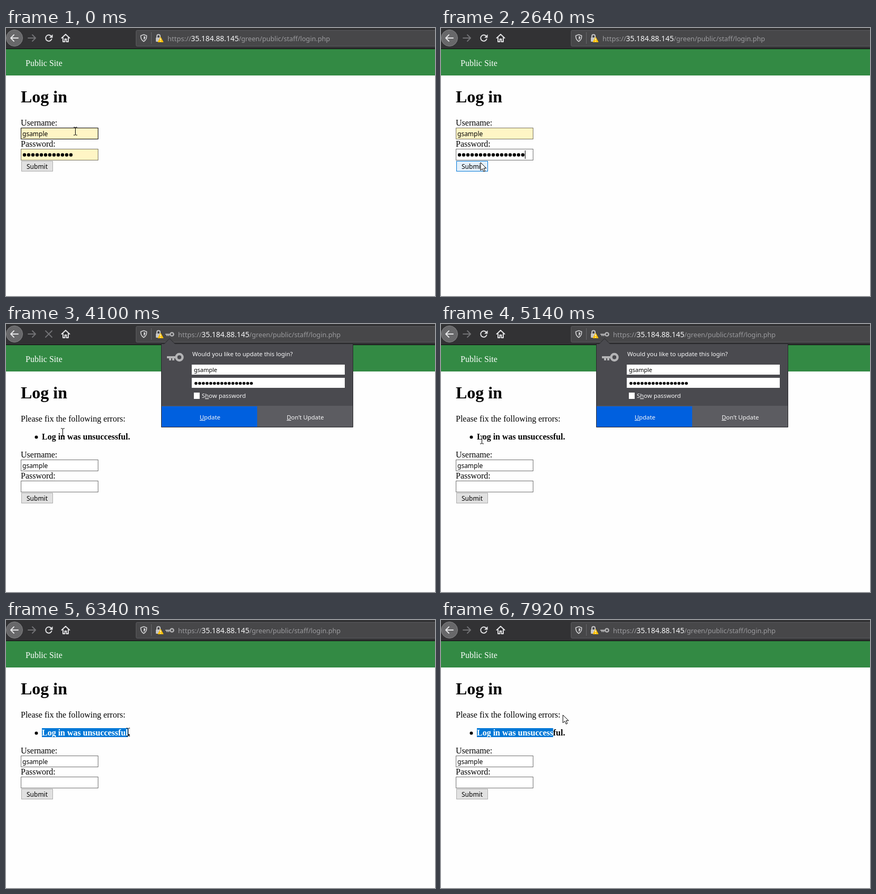
These frames come from a looping animation (813x508 px, 8000 ms). An HTML page:

```html
<!DOCTYPE html>
<html lang="en">
<head>
<meta charset="utf-8">
<title>Log in</title>
<style>
  html, body { margin: 0; width: 100%; height: 100%; overflow: hidden; background: #fefefe; }
  svg { display: block; width: 813px; height: 508px; }
  text { white-space: pre; }
  .serif { font: 16px "Liberation Serif", serif; }
  .bold { font-weight: bold; }
  .title { font-size: 32px; }
  .sans { font: 12px "Noto Sans", "Open Sans", sans-serif; }
  .small { font-size: 11.4px; fill: #f9f9fa; }
  .line { fill: none; stroke: #e4e4e6; stroke-width: 1.9; stroke-linecap: round; stroke-linejoin: round; }
  .dim { stroke: #727275; }
  .under { text-decoration: underline; }
</style>
</head>
<body>
<svg viewBox="0 0 813 508">
  <defs>
    <clipPath id="selClip"><rect id="selClipBox" x="68" y="200" height="26"/></clipPath>
    <g id="keyShape">
      <path d="M0 -2H17V2H14V6H10V2H8V6H4V2H0Z"/>
      <circle cx="23.500" cy="0" r="6" fill="none" stroke="#b4b4b6" stroke-width="4.500"/>
    </g>
  </defs>

  <rect width="813" height="508" fill="#fefefe"/>
  <rect y="39" width="813" height="51" fill="#338a44"/>
  <text class="serif" x="37" y="72" fill="#fff">Public Site</text>
  <text class="serif bold title" x="28" y="141">Log in</text>

  <g id="errors">
    <text class="serif" x="28" y="185">Please fix the following errors:</text>
    <circle cx="57.5" cy="214.5" r="3"/>
    <text class="serif bold" id="message" x="68" y="219">Log in was unsuccessful.</text>
    <rect id="selection" x="68" y="205" height="17" fill="#0078d7"/>
    <text class="serif bold" x="68" y="219" fill="#fff" clip-path="url(#selClip)">Log in was unsuccessful.</text>
  </g>

  <g id="form">
    <text class="serif" x="28" y="185">Username:</text>
    <rect id="userBox" x="28.5" y="189.5" width="146" height="21"/>
    <text class="sans" x="31" y="205">gsample</text>
    <text class="serif" x="28" y="225">Password:</text>
    <rect id="passBox" x="28.5" y="229.5" width="146" height="21"/>
    <g id="passDots"></g>
    <rect id="button" x="29.5" y="252.5" width="59" height="19"/>
    <text class="sans" x="39" y="267">Submit</text>
  </g>
  <rect id="caret" width="1" height="16"/>

  <rect width="813" height="39" fill="#323234"/>
  <rect y="39" width="813" height="1" fill="#0c0c0d"/>
  <circle cx="16" cy="19" r="15.5" fill="#68686a" stroke="#828284"/>
  <path class="line" d="M23 19H9.500M15 13L9 19L15 25"/>
  <path class="line dim" d="M42 19H55.500M50 13L56 19L50 25"/>
  <g id="reload">
    <path class="line" d="M86 16A5.800 5.800 0 1 0 86.500 21"/>
    <path d="M88.500 12V18.500H82Z" fill="#e4e4e6"/>
  </g>
  <path id="stop" class="line dim" d="M75 13L87 25M87 13L75 25"/>
  <path class="line" d="M105.500 19L113 12L120.500 19M108 18.500V26H111.500V21H114.500V26H118V18.500"/>

  <path d="M813 4.500H248.500Q246.500 4.500 246.500 6.500V32.500Q246.500 34.500 248.500 34.500H813" fill="#474749" stroke="#5c5c5f"/>
  <path d="M261 12.500L266.500 14.500Q267 22 261 25.500Q255 22 255.500 14.500Z" fill="none" stroke="#d4d4d6" stroke-width="1.600"/>
  <path d="M261 15.500L264 16.500Q264 20.500 261 22.500Z" fill="#d4d4d6"/>
  <path d="M275.500 8V30" stroke="#67676a"/>
  <path d="M286 18V15.500A3 3 0 0 1 292 15.500V18" fill="none" stroke="#c5c5c7" stroke-width="2"/>
  <rect x="284" y="18" width="10" height="8" rx="1" fill="#c5c5c7"/>
  <path d="M293 17.500L298 26.500H288Z" fill="#ffbf00" stroke="#ffbf00" stroke-linejoin="round"/>
  <path d="M293 19.500V23M293 24.500V26" stroke="#fff" stroke-width="1.300"/>
  <use id="urlKey" href="#keyShape" transform="translate(302 19.500) scale(.53)" fill="#b4b4b6"/>
  <g id="url" class="sans" fill="#9b9b9e">
    <text x="306" y="25" font-size="13">https://</text>
    <text x="350.500" y="25" font-size="13.900" fill="#f9f9fa">35.184.88.145</text>
    <text x="441" y="25" font-size="12.700">/green/public/staff/login.php</text>
  </g>

  <g id="popup" class="sans">
    <path d="M294.500 37.500H300L310 27.500L320 37.500H657.500V195.500H294.500Z" fill="#4a4a4f" stroke="#27272b"/>
    <text class="small" x="353" y="61">Would you like to update this login?</text>
    <rect x="352" y="77" width="290" height="19" fill="#fff"/>
    <text id="popupUser" x="356" y="91" font-size="11"></text>
    <rect x="352" y="102" width="290" height="19" fill="#fff"/>
    <g id="popupDots"></g>
    <rect x="356" y="130" width="11" height="12" fill="#fff"/>
    <text class="small" x="371" y="140">S<tspan class="under">h</tspan>ow password</text>
    <rect x="295" y="155" width="362" height="1" fill="#5b5b60"/>
    <rect x="295" y="156" width="181" height="39" fill="#0060df"/>
    <text class="small" x="367" y="181"><tspan class="under">U</tspan>pdate</text>
    <rect id="second" x="476" y="156" width="181" height="39"/>
    <g id="fresh">
      <use href="#keyShape" transform="translate(305 63)" fill="#b4b4b6"/>
      <text class="small" x="532" y="181"><tspan class="under">D</tspan>on’t Update</text>
    </g>
  </g>

  <path id="beam" d="M-3.500 -7.500H-1L0 -6.500L1 -7.500H3.500M0 -6.500V6.500M-3.500 7.500H-1L0 6.500L1 7.500H3.500" fill="none" stroke="#000"/>
  <path id="arrow" d="M.5 .5V15.500L4 12.200L6.500 17.800L9 16.700L6.500 11.300H11.300Z" fill="#fff" stroke="#000"/>
</svg>
<script>
const LOOP = 8000, STEP = 130;
const SELECT_START = 5800, DRAG_END = 7919;
const $ = id => document.getElementById(id);
const set = (id, attrs) => {
  for (const name in attrs) $(id).setAttribute(name, attrs[name]);
};
const show = (id, on) => set(id, { display: on ? "inline" : "none" });
const within = (x, y, left, top, right, bottom) => x >= left && x <= right && y >= top && y <= bottom;

const progress = (t, start, steps) =>
  Math.max(0, Math.min(1, (Math.floor((t - start) / STEP) + 1) / steps));
const ease = p => p * p * (3 - 2 * p);

const home = { x: 131, y: 195 };
const moves = [
  { start: 380, steps: 2, x: 131, y: 206 },
  { start: 650, steps: 4, x: 144, y: 242 },
  { start: 2380, steps: 3, x: 75, y: 255 },
  { start: 3970, steps: 2, x: 107, y: 205 },
  { start: 4230, steps: 4, x: 77, y: 219 },
  { start: 5410, steps: 1, x: 81, y: 215 },
  { start: 5540, steps: 2, x: 73, y: 215 },
  { start: 5930, steps: 4, x: 231, y: 212 },
  { start: 6470, steps: 6, x: 65, y: 218 },
  { start: 7270, steps: 5, x: 214, y: 198 },
  { start: 7920, steps: 1, x: 231, y: 180 }
];

function pointerAt(t) {
  let { x, y } = home;
  for (const move of moves) {
    const p = ease(progress(t, move.start, move.steps));
    x += (move.x - x) * p;
    y += (move.y - y) * p;
  }
  return { x: Math.round(x), y: Math.round(y) };
}

function makeDots(id, x, y, gap, radius) {
  for (let i = 0; i < 16; i++) {
    const dot = document.createElementNS("http://www.w3.org/2000/svg", "circle");
    dot.setAttribute("cx", x + gap * i);
    dot.setAttribute("cy", y);
    dot.setAttribute("r", radius);
    $(id).append(dot);
  }
}
const showDots = (id, count) => [...$(id).children].forEach((dot, i) => {
  dot.setAttribute("display", i < count ? "inline" : "none");
});

// Selected width snaps to the nearest letter edge
function selectedWidth(x) {
  const message = $("message");
  let best = 0;
  for (let n = 1; n <= message.textContent.length; n++) {
    const width = message.getSubStringLength(0, n);
    if (Math.abs(68 + width - x) < Math.abs(68 + best - x)) best = width;
  }
  return best;
}

function drawForm(t, x, y, failed) {
  const typed = 12 + 4 * progress(t, 1850, 2);
  const field = (id, top, filled) => set(id, {
    fill: filled ? "#fff5c5" : "#fff",
    stroke: !failed && within(x, y, 28, top, 175, top + 22) ? "#000" : filled ? "#76725f" : "#707070"
  });
  set("form", { transform: `translate(0 ${failed ? 68 : 0})` });
  field("userBox", 189, !failed);
  field("passBox", 229, !failed && typed === 12);
  showDots("passDots", failed ? 0 : typed);

  const hover = !failed && within(x, y, 29, 252, 89, 272);
  const pressed = hover && t >= 3320 && t < 3450;
  set("button", {
    fill: pressed ? "#cce4f7" : hover ? "#e5f1fb" : "#e1e1e1",
    stroke: pressed ? "#005499" : hover ? "#0078d7" : "#adadad"
  });

  const inUser = t >= 380 && t < 510;
  show("caret", inUser || (t >= 1440 && t < 3040));
  set("caret", inUser ? { x: 77, y: 192 } : { x: 31 + 8 * typed, y: 232 });
}

function drawPopup(t) {
  const stale = t < 3580;
  const shown = progress(t, 3450, 3) ** 2;
  const opacity = t < 5410 ? shown : t < 5540 ? .125 : 0;
  show("popup", opacity > 0);
  show("fresh", !stale);
  set("popup", { opacity, transform: `translate(0 ${Math.round(7 * (shown - 1))})` });
  set("second", { fill: stale ? "#fff" : "#5c5c61" });
  $("popupUser").textContent = stale ? "gsamplehjkl" : "gsample";
  showDots("popupDots", stale ? 4 : 16);
}

function draw(t) {
  const { x, y } = pointerAt(t);
  const failed = t >= 3840;
  const saved = t >= 3450;
  const loading = t >= 3580 && t < 4230;
  const isArrow = (t >= 2510 && t < 3970) || t > DRAG_END;

  drawForm(t, x, y, failed);
  drawPopup(t);

  show("errors", failed);
  const width = t < SELECT_START ? 0 : selectedWidth(pointerAt(Math.min(t, DRAG_END)).x);
  set("selection", { width });
  set("selClipBox", { width });

  show("reload", !loading);
  show("stop", loading);
  show("urlKey", saved);
  set("url", { transform: `translate(${saved ? 20 : 0} 0)` });

  show("beam", !isArrow);
  show("arrow", isArrow);
  set("beam", { transform: `translate(${x + .5} ${y + .5})` });
  set("arrow", { transform: `translate(${x - .5} ${y - .5})` });
}

makeDots("passDots", 35, 240.5, 8, 3.2);
makeDots("popupDots", 360, 112.5, 7, 2.8);

const start = performance.now();
function tick() {
  draw((performance.now() - start) % LOOP);
  requestAnimationFrame(tick);
}
tick();
</script>
</body>
</html>
```
